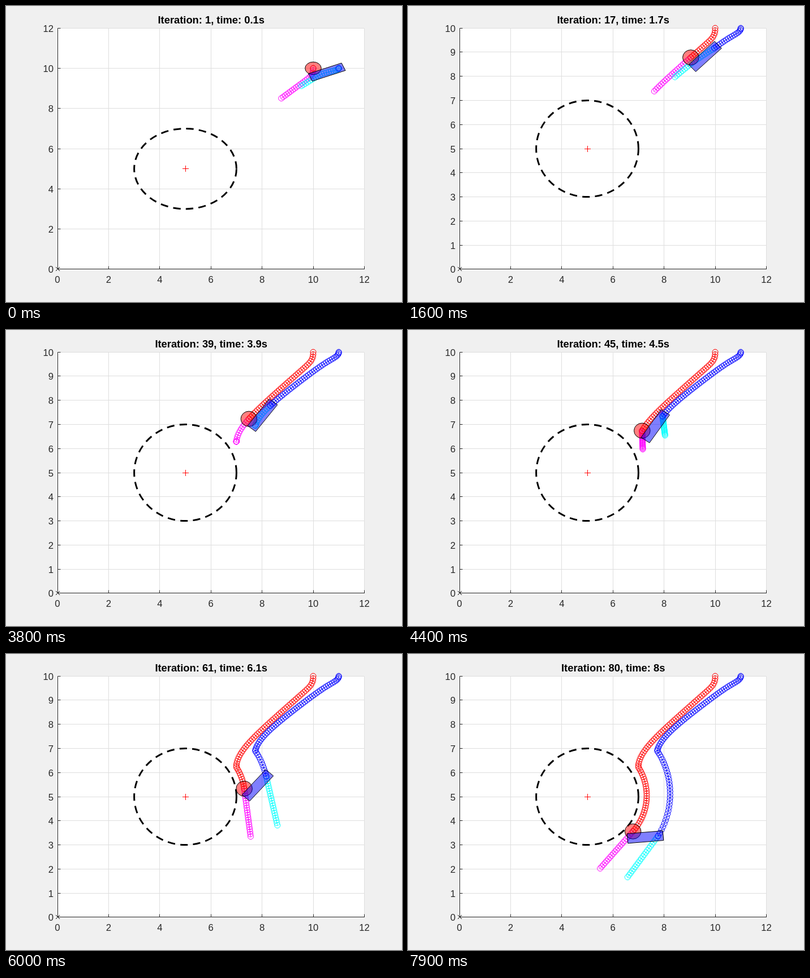
These frames come from a looping animation (700 px wide and 525 px high, 8 s). An HTML page with a canvas:

```html
<!DOCTYPE html>
<html lang="en">
<head>
<meta charset="utf-8">
<title>Robot path planning</title>
<style>
html, body { margin: 0; width: 100%; height: 100%; overflow: hidden; background: #f0f0f0; }
canvas { display: block; }
</style>
</head>
<body>
<canvas id="stage" width="700" height="525"></canvas>
<script>
const ctx = document.getElementById('stage').getContext('2d');
const STEPS = 80, STEP_MS = 100, HORIZON = 20, SPEED = 0.1;
const DODGE = 42, TURN = 50;   // plan swings round the obstacle, robot follows
const LEFT = 91, RIGHT = 633.4, TOP = 39.2, BOTTOM = 466.9;
const INK = '#262626', FONT = '"Liberation Sans", Arial, sans-serif';

const rad = d => d * Math.PI / 180;
const move = ([x, y], deg, d) => [x + d * Math.cos(rad(deg)), y + d * Math.sin(rad(deg))];

// direction of the plan while dodging, in degrees
const aim = t => 302 - (t < TURN ? 5 * (TURN - t) : 2.48 * (t - TURN));

// direction of travel: swing out of the start, run straight, bend at the obstacle, orbit
function course(t) {
  if (t >= TURN) return aim(t);
  return 223 + 47 * Math.exp(-((t / 3.5) ** 2)) + 40 * Math.exp((t - 48.5) / 6);
}

const speed = t => SPEED * (1 - 0.3 * Math.exp(-(((t - TURN) / 2) ** 2)));

// direction from the red point to the blue point
function heading(t) {
  const d = t - TURN;
  if (d > 0) return 42.5 - 0.8 * d - 0.036 * d * d;
  return 16.8 * (1 - Math.exp(-t / 5)) + 0.42 * t + 4.7 * (t / TURN) ** 8;
}

const track = [[10, 10]];
for (let t = 0; t < STEPS; t++) track.push(move(track[t], course(t + 0.5), speed(t + 0.5)));

function pose(t, turn = 0) {
  const red = track[t];
  return { red, blue: move(red, heading(t) + turn, 1) };
}

function predict(t, i) {
  if (t < DODGE) {
    return pose(Math.min(t + i, TURN - 1), 13 * Math.exp(-t / 13) * Math.min(1, i / 10));
  }
  const { red, blue } = pose(t);
  const reach = Math.min(2, 0.93 + 0.16 * (t - 45)) * i / HORIZON;
  return { red: move(red, aim(t), reach), blue: move(blue, aim(t) + 5, reach * 1.04) };
}

let yMax = 10;
const px = x => LEFT + x * (RIGHT - LEFT) / 12;
const py = y => BOTTOM - y * (BOTTOM - TOP) / yMax;
const crisp = v => Math.floor(v) + 0.5;

function line(x1, y1, x2, y2, color) {
  ctx.strokeStyle = color;
  ctx.beginPath();
  ctx.moveTo(x1, y1);
  ctx.lineTo(x2, y2);
  ctx.stroke();
}

function text(s, x, y, align, font, color) {
  ctx.font = font + ' ' + FONT;
  ctx.textAlign = align;
  ctx.fillStyle = color;
  ctx.fillText(s, x, y);
}

// joined line with a circle on every point
function chain(points, color) {
  ctx.strokeStyle = color;
  ctx.beginPath();
  for (const [x, y] of points) ctx.lineTo(px(x), py(y));
  ctx.stroke();
  for (const [x, y] of points) {
    ctx.beginPath();
    ctx.arc(px(x), py(y), 5, 0, 2 * Math.PI);
    ctx.stroke();
  }
}

function ring(x, y, r) {
  ctx.beginPath();
  ctx.ellipse(px(x), py(y), px(r) - px(0), py(0) - py(r), 0, 0, 2 * Math.PI, true);
}

function patch(fill) {
  ctx.fillStyle = fill;
  ctx.fill();
  ctx.strokeStyle = '#000';
  ctx.stroke();
}

function axes(t) {
  ctx.fillStyle = '#f0f0f0';
  ctx.fillRect(0, 0, 700, 525);
  ctx.fillStyle = '#fff';
  ctx.fillRect(LEFT, 39, 543, 428);
  ctx.lineWidth = 1;
  const left = crisp(LEFT), right = crisp(RIGHT), top = crisp(TOP), floor = crisp(BOTTOM);
  const grid = '#dedede', yStep = yMax === 12 ? 2 : 1;
  const gx = v => crisp(px(v)), gy = v => crisp(py(v));
  for (let v = 0; v <= 12; v += 2) line(gx(v), top, gx(v), floor, grid);
  for (let v = 0; v <= yMax; v += yStep) line(left, gy(v), right, gy(v), grid);
  line(left, top, left, floor + 0.5, INK);
  line(left - 0.5, floor, right + 0.5, floor, INK);
  for (let v = 0; v <= 12; v += 2) {
    line(gx(v), floor, gx(v), floor - 5, INK);
    text(v, px(v), 491, 'center', '16.67px', INK);
  }
  for (let v = 0; v <= yMax; v += yStep) {
    line(left, gy(v), left + 5, gy(v), INK);
    text(v, 84, py(v) + 6.5, 'right', '16.67px', INK);
  }
  text(`Iteration: ${t + 1}, time: ${(t + 1) / 10}s`, 362.7, 31, 'center', 'bold 18.33px', '#000');
}

function scenery() {
  const ox = crisp(LEFT), oy = crisp(BOTTOM);
  line(ox - 3.5, oy - 3.5, ox + 3.5, oy + 3.5, '#000');
  line(ox - 3.5, oy + 3.5, ox + 3.5, oy - 3.5, '#000');
  const cx = crisp(px(5)), cy = crisp(py(5));
  line(cx - 5.5, cy, cx + 5.5, cy, '#f00');
  line(cx, cy - 5.5, cx, cy + 5.5, '#f00');
  ctx.lineWidth = 3;
  ctx.strokeStyle = '#000';
  ctx.setLineDash([13.3, 9.2]);
  ring(5, 5, 2);
  ctx.stroke();
  ctx.setLineDash([]);
  ctx.lineWidth = 1;
}

function robot(t) {
  const { red, blue } = pose(t);
  ring(red[0], red[1], 0.316);
  patch('rgba(255,0,0,0.5)');
  const a = heading(t) + 22.3 - 0.08 * t;
  ctx.beginPath();
  for (const [along, side] of [[0.2, 0.2], [0.2, -0.2], [-1.2, -0.2], [-1.2, 0.2]]) {
    const [x, y] = move(move(blue, a, along), a + 90, side);
    ctx.lineTo(px(x), py(y));
  }
  ctx.closePath();
  patch('rgba(0,0,255,0.5)');
}

function draw(t) {
  yMax = pose(t).blue[1] + 0.27 > 10 ? 12 : 10;
  axes(t);
  scenery();
  const past = Array.from({ length: t + 1 }, (_, i) => pose(i));
  const plan = Array.from({ length: HORIZON + 1 }, (_, i) => predict(t, i));
  chain(plan.map(p => p.red), '#f0f');
  chain(plan.map(p => p.blue), '#0ff');
  chain(past.map(p => p.red), '#f00');
  chain(past.map(p => p.blue), '#00f');
  robot(t);
}

let shown = -1;
function tick() {
  const t = Math.floor(performance.now() / STEP_MS) % STEPS;
  if (t !== shown) draw(shown = t);
  requestAnimationFrame(tick);
}
tick();
</script>
</body>
</html>
```
